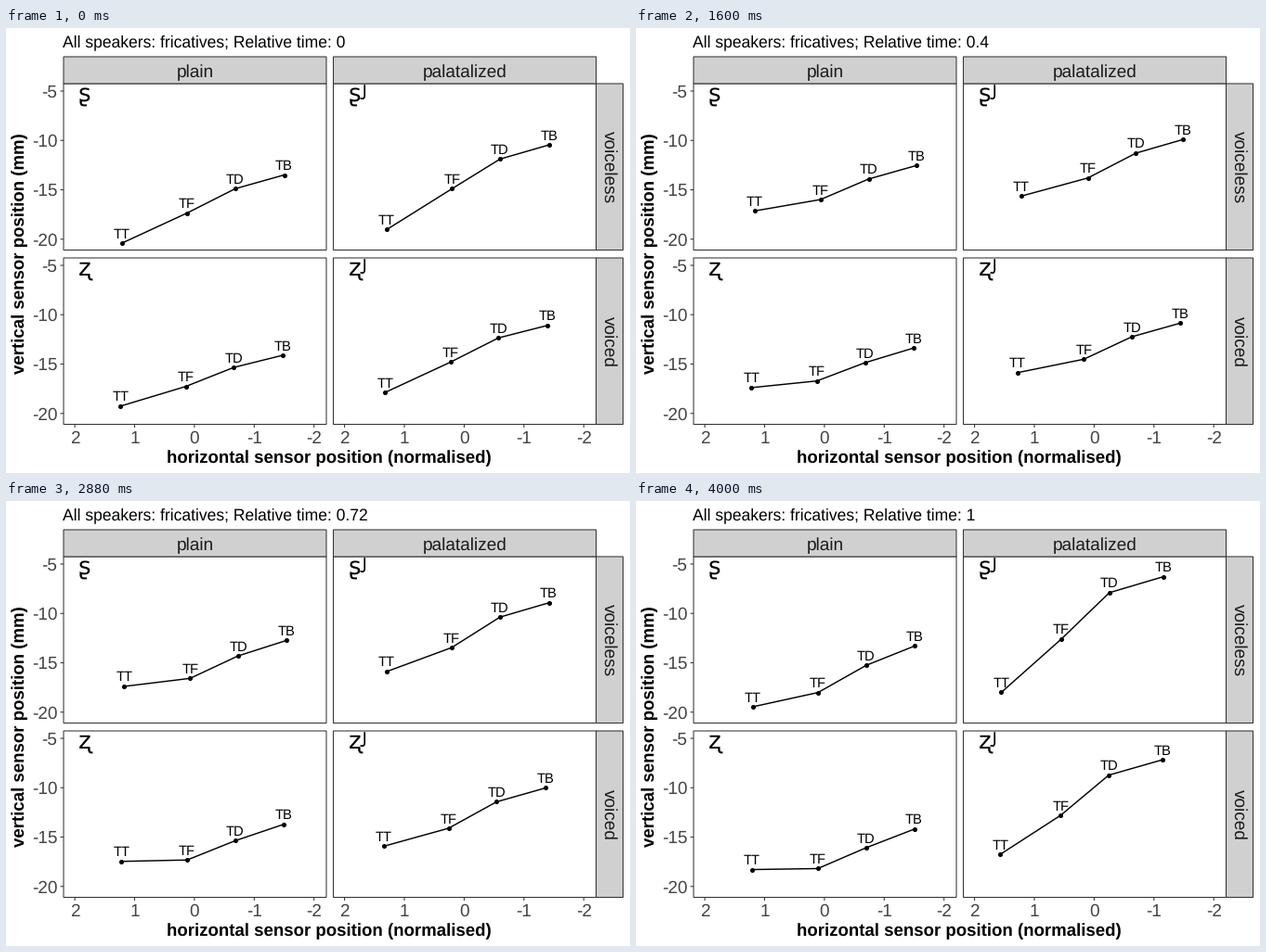
A matplotlib script that plays this animation: 672x480 px, repeating every 4040 ms.

```python
import numpy as np
import matplotlib.pyplot as plt
from matplotlib.animation import FuncAnimation
from matplotlib.patches import Rectangle

W, H, DPI = 672, 480, 100
FRAMES, INTERVAL = 101, 40
PX = 72 / DPI  # points per pixel
GREY, STRIP, TICK = "#333333", "#d0d0d0", "#444444"

PANEL_W, PANEL_H = 283, 179.5
LEFT, RIGHT, TOP, BOTTOM = 62, 352.5, 60, 248
X_UNIT, Y_UNIT = 64.4, 10.65  # pixels per normalised unit and per mm

SENSORS = ("TT", "TF", "TD", "TB")
SPACING = np.array([0, 1.09, 1.894, 2.711])  # distance behind the tongue tip
BOW = np.array([0.75, 1, 1, 0.75])           # share of the horizontal swing

plt.rcParams["font.family"] = ["Liberation Sans", "DejaVu Sans"]
plt.rcParams["text.hinting"] = "none"

fig = plt.figure(figsize=(W / DPI, H / DPI), dpi=DPI, facecolor="white")
ax = fig.add_axes([0, 0, 1, 1])
ax.set_xlim(0, W)
ax.set_ylim(H, 0)
ax.axis("off")


def text(x, y, s, size=19, color="black", ha="center", **kw):
    return ax.text(x, y, s, fontsize=size * PX, color=color, ha=ha,
                   va="baseline", rotation_mode="anchor", **kw)


def box(x, y, w, h, fill):
    ax.add_patch(Rectangle((x, y), w, h, facecolor=fill, edgecolor=GREY,
                           linewidth=1.05 * PX, snap=False))


def line(xs, ys, width, color="black", **kw):
    return ax.plot(xs, ys, color=color, linewidth=width * PX, snap=False,
                   **kw)[0]


def superscript_j(x, y):
    line([x, x, x - 0.6, x - 2, x - 3.8],
         [y, y + 11.5, y + 13.5, y + 14.3, y + 14], 1.7)


class Panel:
    """One facet: the tongue lifts quickly, then releases ever faster.

    tip:     horizontal start of the tongue tip
    swing:   horizontal change during lift and release
    heights: start in mm, and the lift and release added to it
    power:   how late the tongue body releases
    """

    def __init__(self, x, y, symbol, palatal, tip, swing, heights, power):
        self.x, self.y = x, y
        self.tip, self.swing, self.power = tip, swing, power
        self.start, self.lift, self.release = np.array(heights)
        box(x, y, PANEL_W, PANEL_H, "white")
        text(x + 16, y + 18.6, symbol, 26, ha="left", family="DejaVu Sans")
        if palatal:
            superscript_j(x + 33.7, y + 2)
        self.line = line([], [], 1.45, marker="o", markersize=5.1 * PX,
                         markeredgewidth=0)
        self.labels = [text(0, 0, s, 14.7) for s in SENSORS]

    def to_px(self, pos, height):
        return (self.x + PANEL_W / 2 - X_UNIT * pos,
                self.y + 8 - Y_UNIT * (height + 5))

    def pose(self, t):
        rise = 1 - np.exp(-t / 0.13)
        body = t ** self.power
        fall = np.array([t ** 5.5, body, body, body])
        forward = self.swing[0] * rise + self.swing[1] * t ** 4.2
        return self.to_px(self.tip - SPACING + BOW * forward,
                          self.start + self.lift * rise + self.release * fall)

    def draw(self, t):
        xs, ys = self.pose(t)
        self.line.set_data(xs, ys)
        for label, x, y in zip(self.labels, xs, ys):
            label.set_position((x, y - 5.5))
        return [self.line, *self.labels]


panels = [
    Panel(LEFT, TOP, "\u0282", False, 1.22, (-0.06, 0.045),
          [(-20.4, -17.35, -14.89, -13.5),
           (3.43, 1.55, 1.11, 1.06),
           (-2.49, -2.21, -1.48, -0.85)], 3.2),
    Panel(RIGHT, TOP, "\u0282", True, 1.304, (-0.115, 0.46),
          [(-19.03, -14.9, -11.89, -10.46),
           (3.57, 1.11, 0.52, 0.47),
           (-2.54, 1.19, 3.47, 3.71)], 3.8),
    Panel(LEFT, BOTTOM, "\u0290", False, 1.245, (-0.02, -0.015),
          [(-19.26, -17.27, -15.34, -14.11),
           (1.97, 0.89, 0.75, 0.94),
           (-1.0, -1.81, -1.5, -1.03)], 2),
    Panel(RIGHT, BOTTOM, "\u0290", True, 1.33, (-0.07, 0.4),
          [(-17.87, -14.81, -12.35, -11.09),
           (2.11, 0.28, 0.05, 0.16),
           (-0.98, 1.73, 3.57, 3.76)], 4.3),
]

for x, name in ((LEFT, "plain"), (RIGHT, "palatalized")):
    box(x, 31, PANEL_W, 29, STRIP)
    text(x + PANEL_W / 2, 53, name, color="#1a1a1a")
    for n in range(2, -3, -1):
        tx = x + PANEL_W / 2 - 0.6 - X_UNIT * n
        line([tx, tx], [427.5, 431], 1.05, GREY, solid_capstyle="butt")
        text(tx, 448, str(n), color=TICK)

for y, name in ((TOP, "voiceless"), (BOTTOM, "voiced")):
    box(635.5, y, 29, PANEL_H, STRIP)
    text(644, y + 90.5, name, color="#1a1a1a", rotation=270)
    for n in range(-5, -21, -5):
        ty = y + 8 - Y_UNIT * (n + 5)
        line([58.5, 62], [ty, ty], 1.05, GREY, solid_capstyle="butt")
        text(55.5, ty + 6.6, str(n), color=TICK, ha="right")

text(348.3, 469, "horizontal sensor position (normalised)", 18.65,
     weight="bold")
text(20.5, 243.5, "vertical sensor position (mm)", 18.65, weight="bold",
     rotation=90)
title = text(61.3, 20, "", 17.55, ha="left")


def update(k):
    t = k / (FRAMES - 1)
    title.set_text(f"All speakers: fricatives; Relative time: {t:g}")
    return [title] + [a for p in panels for a in p.draw(t)]


anim = FuncAnimation(fig, update, frames=FRAMES, interval=INTERVAL,
                     repeat=True, repeat_delay=0, blit=False)
plt.show()
```
